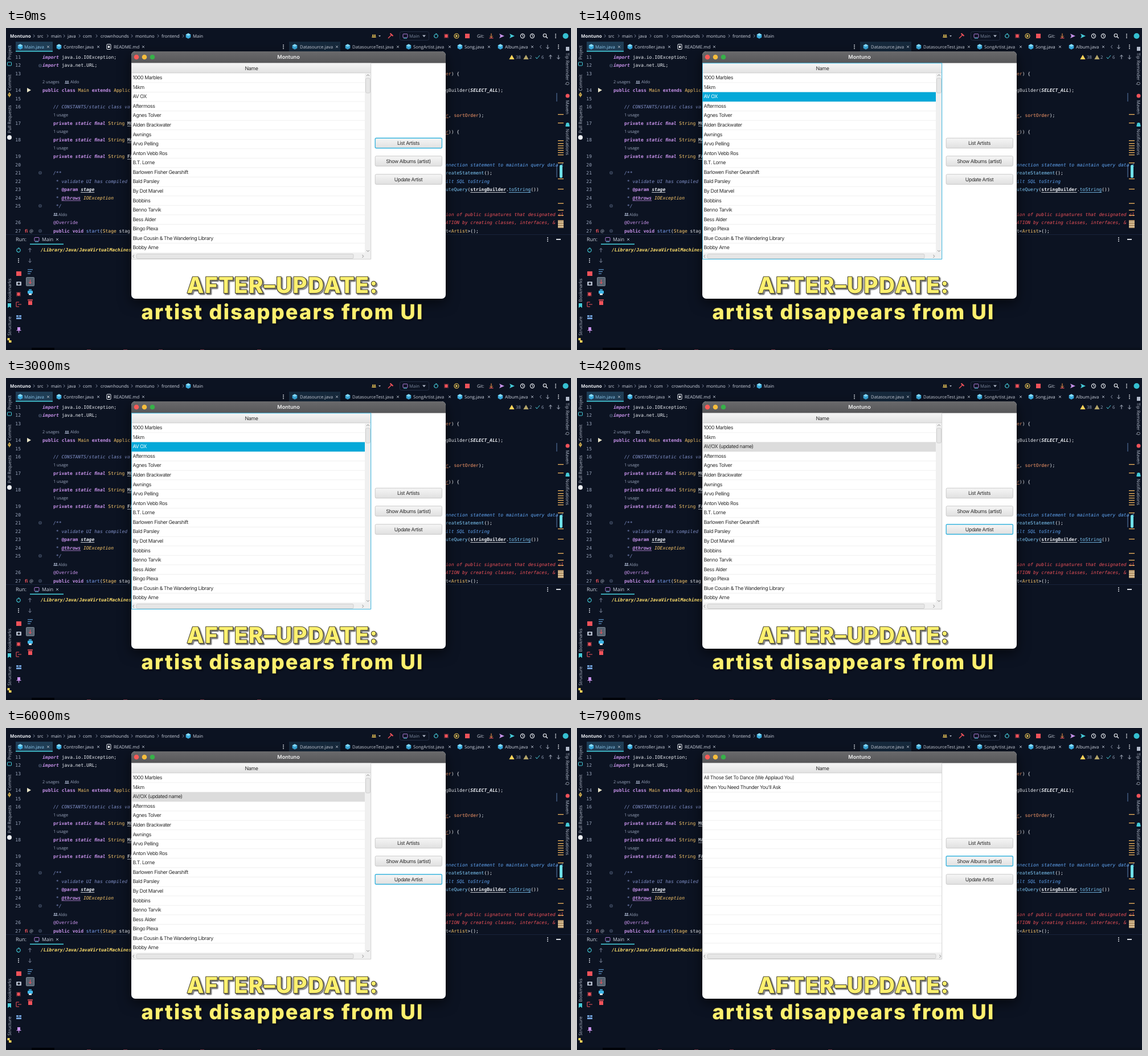
Recreate the animation shown at these times as an HTML page with a canvas. Size 992 by 565 pixels, loop 8000 ms.

```html
<!DOCTYPE html>
<html lang="en">
<head>
<meta charset="utf-8">
<title>Montuno</title>
<style>
  html, body { margin: 0; width: 100%; height: 100%; overflow: hidden; background: #0c1322; }
  canvas { display: block; width: 992px; height: 565px; }
</style>
</head>
<body>
<canvas id="stage" width="992" height="565"></canvas>
<script>
const g = document.getElementById('stage').getContext('2d');
const UI = '"Open Sans", "Noto Sans", sans-serif';
const APP = 'Inter, Roboto, sans-serif';
const MONO = '"DejaVu Sans Mono", "Noto Sans Mono", monospace';
const LOOP = 8000, SELECT = 300, UPDATE = 3500, ALBUMS = 6200;
const C = {
  bg: '#0c1322', text: '#d0d6e2', dim: '#7f899f', white: '#eef1f6', kw: '#c792ea',
  type: '#ffcb6b', note: '#8292cb', blue: '#62a8f8', red: '#f0525a', teal: '#45cbd8',
  yellow: '#ffd45a', icon: '#b1b9c9', hint: '#9ba6bd', focus: '#38b4de'
};
const CHAR = 4.816, ROW = 14.53, TOP = 51;
const LINE = 16.57;

const artists = ['1000 Marbles', '14km', 'AV OX', 'Aftermoss', 'Agnes Tolver', 'Alden Brackwater',
  'Awnings', 'Arvo Pelling', 'Anton Vebb Ros', 'B.T. Lorne', 'Barlowen Fisher Gearshift',
  'Bald Parsley', 'By Dot Marvel', 'Bobbins', 'Benno Tarvik', 'Bess Alder', 'Bingo Plexa',
  'Blue Cousin & The Wandering Library', 'Bobby Arne'];
const albums = ['All Those Set To Dance (We Applaud You)', "When You Need Thunder You'll Ask"];

function rect(x, y, w, h, fill) { g.fillStyle = fill; g.fillRect(x, y, w, h); }

function round(x, y, w, h, r, fill, stroke, lw = 1) {
  g.beginPath(); g.roundRect(x, y, w, h, r);
  if (fill) { g.fillStyle = fill; g.fill(); }
  if (stroke) { g.strokeStyle = stroke; g.lineWidth = lw; g.stroke(); }
}

function dot(x, y, r, fill) {
  g.beginPath(); g.arc(x, y, r, 0, 7); g.fillStyle = fill; g.fill();
}

function ring(x, y, r, color, from = 0, to = 6.3) {
  g.beginPath(); g.arc(x, y, r, from, to); g.strokeStyle = color; g.lineWidth = 1.1; g.stroke();
}

// Polyline from flat x, y offsets around a point
function path(x, y, pts, color, fill = false, lw = 1) {
  g.beginPath();
  for (let i = 0; i < pts.length; i += 2) g.lineTo(x + pts[i], y + pts[i + 1]);
  g.lineWidth = lw;
  if (fill) { g.closePath(); g.fillStyle = color; g.fill(); }
  else { g.strokeStyle = color; g.stroke(); }
}

// y is the optical middle of the line
function text(s, x, y, o = {}) {
  const size = o.size || 7.8;
  g.font = `${o.style || ''} ${o.weight || 500} ${size}px ${o.font || UI}`;
  g.letterSpacing = (o.space || 0) + 'px';
  g.textAlign = o.align || 'left';
  g.fillStyle = o.color || C.text;
  g.fillText(s, x, y + size * .36);
  g.letterSpacing = '0px';
}

function side(s, x, y, turn) {
  g.save(); g.translate(x, y); g.rotate(turn * Math.PI / 2);
  text(s, 0, 0, { align: 'center', color: '#b8c0cf' });
  g.restore();
}

const appText = (s, x, y, color = '#2c2c2c', align = 'left') =>
  text(s, x, y, { font: APP, size: 8.8, weight: 400, space: -.4, color, align });

// Tokens: [text, colour, style flags: b bold, i italic, u underline]
function code(x, row, ...tokens) {
  const y = TOP + row * ROW;
  for (const [s, color, f = ''] of tokens) {
    text(s, x, y, { font: MONO, size: 8, color, weight: f.includes('b') ? 700 : 400,
      style: f.includes('i') ? 'italic' : '' });
    if (f.includes('u')) rect(x, y + 4.5, s.length * CHAR, .8, color);
    x += s.length * CHAR;
  }
}

const chevron = (x, y) => path(x, y, [-1, -2.5, 1.2, 0, -1, 2.5], C.dim);
const cross = (x, y) => {
  path(x, y, [-2, -2, 2, 2], C.icon, false, .9); path(x, y, [2, -2, -2, 2], C.icon, false, .9);
};
const dots = (x, y) => [-3, 0, 3].forEach(d => dot(x, y + d, .9, C.white));
const arrow = (x, y, d, color) => {
  path(x, y, [0, -3.5 * d, 0, 3.5 * d], color);
  path(x, y, [-2.6, .8 * d, 0, 3.5 * d, 2.6, .8 * d], color);
};
const classIcon = (x, y) => {
  path(x, y, [0, -4.8, 4.3, -2.4, 4.3, 2.4, 0, 4.8, -4.3, 2.4, -4.3, -2.4], '#39a9dc', true);
  path(x, y, [-4.3, -2.4, 0, -4.8, 4.3, -2.4, 0, 0], '#8adcf7', true);
};
const person = (x, y, color) => {
  dot(x, y - 1.3, 1.3, color);
  g.beginPath(); g.arc(x, y + 2.6, 2.2, Math.PI, 0); g.fill();
};
const people = (x, y, color) => { person(x - 1.7, y, color); person(x + 1.7, y, color); };
const bug = (x, y, color) => {
  dot(x, y, 2.8, color);
  [-2, 0, 2].forEach(d => path(x, y, [-4, d * 1.4, 4, d * 1.4], color, false, .8));
};
const reload = (x, y, color) => {
  ring(x, y, 3.2, color, -.9, 4.4);
  path(x, y, [-.5, -5, 2.4, -3.4, -.5, -1.5], color, true);
};
const clock = (x, y) => { ring(x, y, 3.6, C.white); path(x, y, [0, -2.2, 0, 0, 2, 1], C.white); };
const consoleIcon = (x, y) => {
  round(x - 4, y - 3.5, 8, 6.5, 1, null, '#b07bd8'); rect(x - 3, y + 3.5, 6, 1, C.teal);
};

function toolbar() {
  text('Montuno', 7, 14, { weight: 700, size: 8, color: C.white });
  [['src', 55], ['main', 79], ['java', 108], ['com', 135], ['crownhounds', 166],
    ['montuno', 227], ['frontend', 273], ['Main', 328]].forEach(([s, x]) => text(s, x, 14));
  [49, 73, 102, 129, 159, 221, 267, 311].forEach(x => chevron(x, 14));
  classIcon(320, 14);

  people(646, 14, C.yellow); path(656, 14, [-2, -1, 2, -1, 0, 1.5], C.icon, true);
  path(675, 14, [-4, 4, 2, -2], C.red, false, 1.4); path(676, 12, [-1.5, -2.5, 3.5, 2], C.red, false, 2.2);
  round(691.5, 6.5, 51, 15, 3, null, '#232d42');
  consoleIcon(701, 14); text('Main', 708, 14, { color: '#7d899f' });
  path(734, 14, [-3, -1.5, 3, -1.5, 0, 2], C.icon, true);
  reload(755, 14, C.teal); bug(773, 14, C.red);
  ring(791, 14, 4, C.yellow); path(791, 14, [-1.5, -2.5, 2.5, 0, -1.5, 2.5], C.yellow, true);
  rect(806, 10, 8, 8, C.red);
  text('Git:', 827, 14);
  arrow(852, 13, 1, '#ff9d4d'); rect(848.5, 17, 7, 1.2, C.red);
  [[870, C.kw], [888, C.teal]].forEach(([x, c]) => path(x, 14, [-4, -4, 5, 0, -4, 4, -2, 0], c, true));
  clock(907, 14); clock(924, 14);
  ring(946, 13, 2.8, C.white); path(946, 13, [2, 2, 5, 5], C.white, false, 1.3);
  dots(965, 14); dot(982.5, 14, 5, '#35bfd0');
}

function tab(s, icon, x, close) {
  classIcon(icon, 33); text(s, x, 33); cross(close, 33);
}

function tabs() {
  rect(17, 24, 65, 17, '#1f3d55'); rect(17, 40, 65, 1.6, C.teal);
  rect(497, 24, 90, 17, '#16293c');
  classIcon(25, 33); text('Main.java', 32, 33, { color: '#8fc8ee' }); cross(74, 33);
  tab('Controller.java', 93, 101, 162);
  round(177, 28.5, 7, 9, 1, null, C.white); rect(179, 31, 3, 4, C.white);
  text('README.md', 189, 33); cross(241, 33);
  dots(487, 33);
  tab('Datasource.java', 507, 516, 581);
  tab('DatasourceTest.java', 600, 608, 688);
  tab('SongArtist.java', 707, 715, 779);
  tab('Song.java', 797, 805, 848);
  tab('Album.java', 868, 876, 924);
  path(939, 33, [1, -3, -1.5, 0, 1, 3], C.dim); arrow(951, 33, 1, C.icon);
  dots(970, 33);
}

function strips() {
  side('Project', 6, 43, -1); round(2.5, 60, 7, 6, 1, null, C.teal);
  side('Commit', 6, 96, -1); ring(6, 117, 2, C.yellow); path(6, 117, [0, -4.5, 0, 4.5], C.yellow);
  side('Pull Requests', 6, 160, -1); dot(6, 192, 4, C.white);
  side('Bookmarks', 6, 460, -1); path(6, 487, [-3, -4, 3, -4, 3, 4, 0, 2, -3, 4], C.teal, true);
  side('Structure', 6, 523, -1); rect(2.5, 544, 4, 4, C.yellow); rect(5, 548, 4.5, 4, C.yellow);
  rect(983, 33, 6, 7, C.icon);
  side('Tip Reminder Q', 986, 72, 1);
  dot(986, 119, 3.5, C.red); side('Maven', 986, 139, 1);
  dot(986, 169, 3, C.teal); rect(982.5, 170, 7, 3, C.teal); side('Notifications', 986, 200, 1);
}

function editor() {
  const numbered = [0, 1, 2, 4, 5, 6, 8, 10, 12, 13, 14, 15, 16, 17, 18, 20, 21];
  numbered.forEach((row, i) =>
    text(String(11 + i), 26, TOP + row * ROW, { font: MONO, size: 8, align: 'right', color: C.hint }));
  [66, 254, 312, 356].forEach(y => {
    ring(60, y, 2.3, '#46526a'); path(60, y, [-1.2, 0, 1.2, 0], '#46526a');
  });
  path(40, 109, [-3, -4, 4, 0, -3, 4], '#e9e4c8', true);
  text('ﬁ', 33, 356, { color: C.red, weight: 700 }); text('@', 41, 356, { color: C.icon });

  const hint = (s, x, row) => text(s, x, TOP + row * ROW, { size: 7.3, color: C.hint });
  const { kw, type, white, note } = C;
  code(64, 0, ['import ', kw, 'bi'], ['java.io.IOException;', white]);
  code(64, 1, ['import ', kw, 'bi'], ['java.net.URL;', white]);
  hint('2 usages', 64, 3); people(107, 95, C.hint); hint('Aldo', 113, 3);
  code(64, 4, ['public class ', kw, 'b'], ['Main ', type], ['extends ', kw, 'b'], ['Applic', type]);
  code(83, 6, ['// CONSTANTS/static class va', note, 'i']);
  ['M', 'M', 'F'].forEach((s, i) => {
    hint('1 usage', 83, 7 + i * 2);
    code(83, 8 + i * 2, ['private ', kw, 'b'], ['static ﬁnal ', kw, 'bi'], ['String ', type],
      [s + (i ? 'A' : 'O'), white, 'bu']);
  });
  code(83, 14, ['/**', note, 'i']);
  code(83, 15, [' * validate UI has compiled', note, 'i']);
  code(83, 16, [' * ', note, 'i'], ['@param', kw, 'b'], [' ', note], ['stage', white, 'biu']);
  code(83, 17, [' * ', note, 'i'], ['@throws', kw, 'biu'], [' ', note], ['IOException', type, 'i']);
  code(83, 18, [' */', note, 'i']);
  people(87, 327, C.hint); hint('Aldo', 92, 19);
  code(83, 20, ['@Override', kw]);
  code(83, 21, ['public void ', kw, 'b'], ['start', '#82aaff'], ['(', white], ['Stage ', type], ['stag', white]);

  code(772, 2, ['er', '#ff9d6b'], [') {', white]);
  code(772, 4, ['gBuilder(', white], ['SELECT_ALL', white, 'bi'], [');', white]);
  code(772, 7, ['r', '#ff9d6b', 'u'], [', ', white], ['sortOrder', '#ff9d6b'], [');', white]);
  code(772, 9, ['r', '#ff9d6b', 'u'], [')) {', white]);
  code(772, 13, ['nnection statement to maintain query data i', C.blue, 'i']);
  code(772, 14, ['reateStatement', '#82cfff'], ['();', white]);
  code(772, 15, ['ilt SQL toString', C.blue, 'i']);
  code(772, 16, ['uteQuery', '#82cfff'], ['(', white], ['stringBuilder', white, 'bu'], ['.', white],
    ['toString', '#82cfff', 'u'], ['())', white]);
  code(772, 19, ['ion of public signatures that designated cl', C.red, 'i']);
  code(772, 20, ['ATION by creating classes, interfaces, & me', C.red, 'i']);
  code(772, 21, ['t<', white], ['Artist', type], ['>();', white]);

  const warn = (x, c) => path(x, 51, [0, -4, 4.6, 4, -4.6, 4], c, true);
  const count = (s, x) => text(s, x, 51, { color: C.hint });
  warn(888, C.yellow); count('38', 895); warn(913, '#b5a66a'); count('2', 919);
  path(933, 51, [-3, 0, -1, 3, 4, -3], C.teal); count('6', 940);
  arrow(956, 51, -1, C.icon); arrow(970, 51, 1, C.icon);

  rect(966.5, 114, 1, 15, '#5d7fae'); rect(966.5, 240, 1, 22, '#5d7fae');
  [151, 166, 197, 202, 206, 210, 214, 218, 222, 236, 264, 282, 307, 319, 328]
    .forEach(y => rect(969, y, 10, 1.3, '#f0b45c'));
  rect(969, 337, 10, 14, '#b3946a'); [340, 344, 348].forEach(y => rect(969, y, 10, 1, '#f0dcb4'));
  round(972, 240, 5, 23, 2.5, '#6fe0e8');
}

function runPanel() {
  rect(0, 362, 992, 1, '#18233a');
  text('Run:', 17, 371, { size: 9 });
  consoleIcon(54, 371); text('Main', 63, 371, { size: 8.7 }); cross(90, 371);
  rect(42, 378.5, 59, 1.6, C.teal);
  dots(951, 371); rect(966, 370, 8, 1.8, C.white);
  text('/Library/Java/JavaVirtualMachines', 61, 389,
    { font: MONO, size: 8, weight: 700, style: 'italic', color: '#ffe06b' });

  reload(22, 390, C.teal); dots(22, 408);
  rect(18, 427, 9, 8, C.red);
  round(18, 445, 9, 7, 1, C.icon); dot(22.5, 448.5, 2, C.bg);
  bug(22, 467, C.red);
  path(22, 485, [1, -4, -4, -4, -4, 4, 1, 4], C.red); path(22, 485, [-1, 0, 5, 0], C.red);
  rect(18, 504, 4, 3, '#6f9fd8'); rect(23, 504, 4, 3, '#6f9fd8'); rect(18, 508, 9, 3, '#6f9fd8');
  rect(20, 525, 5, 5, C.kw); rect(18.5, 530, 8, 1.2, C.kw); rect(22, 531, 1, 4, C.kw);

  arrow(42, 390, -1, C.dim); arrow(42, 408, 1, C.dim);
  [-3.5, 0, 3.5].forEach((d, i) => rect(38, 427 + d, 9 - i * 2, 1, '#6fb3ee'));
  round(35.5, 437.5, 14, 15, 1, '#56616f', '#7d8996'); arrow(42.5, 445, 1, C.red);
  rect(38, 461, 9, 5, '#3fb6e8'); rect(40, 458.5, 5, 2, '#3fb6e8'); rect(40, 466, 5, 2.5, C.white);
  rect(39, 479, 7, 7, C.red); rect(38, 476.5, 9, 1.6, C.red);

  rect(0, 561, 992, 4, '#0a101c'); rect(45, 561, 40, 4, '#010309');
  [142, 206, 268, 341, 441].forEach(x => rect(x, 564, 7, 1, '#6b3442'));
}

function button(label, y, focused) {
  const fill = g.createLinearGradient(0, y, 0, y + 18);
  fill.addColorStop(0, '#f6f6f6'); fill.addColorStop(1, '#e0e0e0');
  round(648.2, y + .2, 117.2, 17.6, 2, fill, focused ? C.focus : '#c4c4c4', focused ? 1.4 : .9);
  appText(label, 706.5, y + 9, '#2c2c2c', 'center');
}

function table(t) {
  const showAlbums = t >= ALBUMS, picked = t >= SELECT && !showAlbums;
  const active = picked && t < UPDATE;
  const right = showAlbums ? 641 : 630;
  const top = 79.4;

  const head = g.createLinearGradient(0, 62, 0, 79);
  head.addColorStop(0, '#f5f5f5'); head.addColorStop(1, '#e2e2e2');
  rect(220, 62, 421, 17, head); rect(220, 78.5, 421, .8, '#cacaca');
  appText('Name', 431, 70.5, '#2c2c2c', 'center');

  for (let i = 1; i < 20; i++) rect(220, top + i * LINE - .5, right - 220, .8, '#ececec');
  if (picked) rect(220, top + 2 * LINE, 410, LINE, active ? '#05a8d8' : '#dcdcdc');
  (showAlbums ? albums : artists).forEach((s, i) => {
    const chosen = i === 2 && picked;
    const name = chosen && !active ? 'AV/OX (updated name)' : s;
    appText(name, 222.5, 87 + i * LINE, chosen && active ? '#fff' : '#2c2c2c');
  });

  const grey = '#8b8b8b', track = '#f0f0f0', thumb = '#e6e6e6', edge = '#c8c8c8';
  rect(220, 395, 421, 11, track);
  path(224, 400.5, [1, -2.5, -1.2, 0, 1, 2.5], grey);
  path(right - 3.5, 400.5, [-1, -2.5, 1.2, 0, -1, 2.5], grey);
  round(229, 396.5, showAlbums ? 401 : 381, 8, 2, thumb, edge, .8);
  if (!showAlbums) {
    rect(630, 79, 11, 327, track);
    path(635.5, 83, [-2.5, 1, 0, -1.2, 2.5, 1], grey);
    path(635.5, 391, [-2.5, -1, 0, 1.2, 2.5, -1], grey);
    round(631.5, 88, 8, 26, 2, thumb, edge, .8);
  }
  g.strokeStyle = active ? C.focus : '#d2d2d2'; g.lineWidth = 1;
  g.strokeRect(220.3, 61.7, 420.4, 344);
}

function appWindow(t) {
  g.save();
  g.shadowColor = 'rgba(0,0,0,.6)'; g.shadowBlur = 22; g.shadowOffsetY = 7;
  round(220, 41, 552, 434, 7, '#fff');
  g.restore();
  g.save();
  g.beginPath(); g.roundRect(220, 41, 552, 434, 7); g.clip();
  const bar = g.createLinearGradient(0, 41, 0, 62);
  bar.addColorStop(0, '#6a6a6c'); bar.addColorStop(1, '#565658');
  rect(220, 41, 552, 20.5, bar);
  [['#fc5b57', 229], ['#f5bd3c', 243], ['#36b148', 257]].forEach(([c, x]) => dot(x, 51, 4.3, c));
  text('Montuno', 496, 51, { font: APP, size: 9.1, weight: 600, color: '#f0f0f0', align: 'center' });
  table(t);
  button('List Artists', 193, t < SELECT);
  button('Show Albums (artist)', 224.5, t >= ALBUMS);
  button('Update Artist', 256.5, t >= UPDATE && t < ALBUMS);
  g.restore();
}

function caption(s, y, size, space, edge) {
  g.font = `800 ${size}px ${APP}`;
  g.letterSpacing = space + 'px';
  g.textAlign = 'center';
  g.lineJoin = 'round';
  g.save();
  g.shadowColor = 'rgba(0,0,0,.75)'; g.shadowBlur = 2; g.shadowOffsetX = 2; g.shadowOffsetY = 2;
  g.strokeStyle = '#3a3624'; g.lineWidth = edge;
  g.strokeText(s, 485.5, y);
  g.restore();
  g.fillStyle = '#fdf06f';
  g.fillText(s, 485.5, y);
  g.letterSpacing = '0px';
}

function draw(t) {
  rect(0, 0, 992, 565, C.bg);
  toolbar(); tabs(); editor(); runPanel(); strips();
  appWindow(t);
  caption('AFTER–UPDATE:', 464.5, 39, 1.3, 2);
  caption('artist disappears from UI', 511, 36, 2.25, 1);
}

g.textRendering = 'geometricPrecision';
const start = performance.now();
function tick() {
  draw((performance.now() - start) % LOOP);
  requestAnimationFrame(tick);
}
tick();
</script>
</body>
</html>
```
